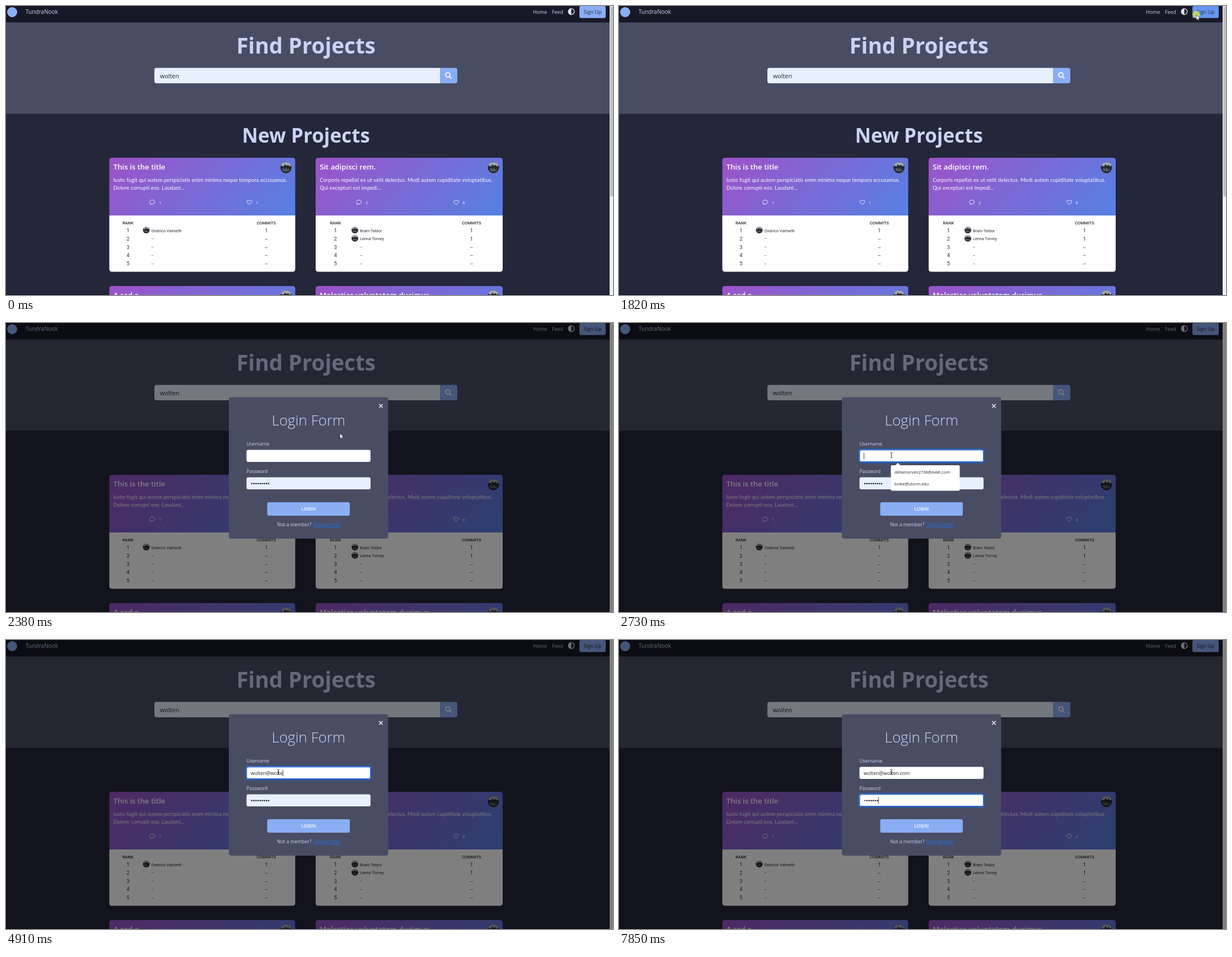
These frames come from a looping animation (1084 px wide and 516 px high, 8000 ms). An HTML page:

```html
<!DOCTYPE html>
<html lang="en">
<head>
<meta charset="utf-8">
<title>Find Projects</title>
<style>
  html, body { margin: 0; width: 100%; height: 100%; overflow: hidden; background: #24273a; }
  svg { display: block; width: 1084px; height: 516px; }
  text { font-family: "Open Sans", "Noto Sans", sans-serif; fill: #cad3f5; white-space: pre; }
  .mid { text-anchor: middle; }
  .w3 { font-weight: 300; }
  .w5 { font-weight: 500; }
  .w6 { font-weight: 600; }
  .w7 { font-weight: 700; }
  .white { fill: #fff; }
  .dark { fill: #24273a; }
  .ink { fill: #212529; }
  .link { fill: #1a73e8; text-decoration: underline; }
  .body { font-family: Lato, "Open Sans", sans-serif; letter-spacing: .12px; fill: #fff; }
  .cell { font-family: Roboto, sans-serif; fill: #2b2f33; }
</style>
</head>
<body>
<svg id="stage" viewBox="0 0 1084 516" xmlns="http://www.w3.org/2000/svg"></svg>
<script>
const LOOP = 8000;
const USER = 'wolten';
const EMAIL = USER + '@' + USER + '.com';
const FIELD_X = 437, DOT_STEP = 3.75;

const text = (x, y, size, cls, str, id = '') =>
  `<text x="${x}" y="${y}" font-size="${size}" class="${cls}"${id && ` id="${id}"`}>${str}</text>`;
const rect = (x, y, w, h, fill, r = 0, more = '') =>
  `<rect x="${x}" y="${y}" width="${w}" height="${h}" rx="${r}" fill="${fill}" ${more}/>`;
const circle = (x, y, r, fill, more = '') =>
  `<circle cx="${x}" cy="${y}" r="${r}" fill="${fill}" ${more}/>`;
const dots = (n, y, fill) => Array.from({ length: n }, (_, i) =>
  circle(439 + i * DOT_STEP, y, 1.3, fill)).join('');

const avatar = (x, y, r) => `<g transform="translate(${x} ${y}) scale(${r / 10})">
  ${circle(0, 0, 10, '#25272c')}
  <path d="M-9.3-3.5A10 10 0 0 1 9.3-3.5L6-2L4-5L1-3L-2-6L-4-2Z" fill="#a3a9af"/>
  <path d="M-7 3L-4 0L-2 3L1 0L3 4L6 1L5 6L0 7L-5 6Z" fill="#565b62"/></g>`;

const bubble = x => `<path transform="translate(${x} 79.5)" fill="none" stroke="#fff" stroke-width=".9"
  d="M-3.2 4L-3 1.9C-6-.5-3.8-4 0-4C6-4 6 3.2 0 3.2C-.9 3.2-1.4 3-1.8 2.9Z"/>`;
const heart = x => `<path transform="translate(${x} 79.5)" fill="none" stroke="#fff" stroke-width=".9"
  d="M0 4.1L-3.8.3C-6-2.2-2.5-5.4 0-2.4C2.5-5.4 6-2.2 3.8.3Z"/>`;

// Column positions are relative to the left edge of the card.
function card(c) {
  const w = c.w;
  let out = `<g transform="translate(${c.x} ${c.y})">` +
    `<path d="M0 103V5Q0 0 5 0H${w - 5}Q${w} 0 ${w} 5V103Z" fill="url(#shade)"/>` +
    `<path d="M0 103V198.5Q0 203.5 5 203.5H${w - 5}Q${w} 203.5 ${w} 198.5V103Z" fill="#fff"/>` +
    text(7.2, 21.3, 13.2, 'w6 white', c.title) + avatar(w - 16.5, 17.5, 10);
  if (c.lines) {
    out += c.lines.map((s, i) => text(7.2, 43 + i * 13.6, 9.35, 'body', s)).join('');
    out += bubble(c.talk) + text(c.talk + 12, 83, 7.3, 'white', c.counts[0]);
    out += heart(c.like) + text(c.like + 11.5, 83, 7.3, 'white', c.counts[1]);
    out += text(c.rank, 118.5, 7.5, 'cell w5 mid', 'RANK');
    out += text(c.commits, 118.5, 7.5, 'cell w5 mid', 'COMMITS');
    for (let i = 0; i < 5; i++) {
      const y = 132.9 + i * 14.8, name = c.names[i];
      out += text(c.rank, y, 9.4, 'cell mid', i + 1);
      out += text(c.name, y - .3, 7.3, 'cell', name || '--');
      out += text(c.commits, y, 9.4, 'cell mid', name ? 1 : '--');
      if (name) out += avatar(c.name - 9, y - 4, 6);
    }
  }
  return out + '</g>';
}

const left = { x: 184.5, w: 332 }, right = { x: 553, w: 334 };
const cards = [
  { ...left, y: 271, title: 'This is the title', talk: 76.5, like: 250, counts: [1, 1],
    rank: 33.3, name: 75, commits: 280.3, names: ['Ondrico Valmeth'],
    lines: ['Iusto fugit qui autem perspiciatis enim minima neque tempora accusamus.',
            'Dolore corrupti eos. Laudant...'] },
  { ...right, y: 271, title: 'Sit adipisci rem.', talk: 77, like: 251, counts: [2, 6],
    rank: 35.3, name: 79, commits: 278.3, names: ['Bram Teldor', 'Lenna Torvey'],
    lines: ['Corporis repellat ex ut velit delectus. Modi autem cupiditate voluptatibus.',
            'Qui excepturi est impedi...'] },
  { ...left, y: 500, title: 'A sed e' },
  { ...right, y: 500, title: 'Molestias voluptatem ducimus' }
];

const page = `
  ${rect(0, 0, 1084, 516, '#24273a')}
  ${rect(0, 0, 1078, 29.5, '#181926')}
  ${rect(0, 29.5, 1078, 163, '#494d64')}
  ${circle(11, 11, 9, '#8aadf4')}
  ${text(35, 13.5, 10, 'w5', 'TundraNook')}
  ${text(941.3, 14.3, 8.8, '', 'Home')}
  ${text(975, 14.3, 8.8, '', 'Feed')}
  ${circle(1009.5, 10, 5.3, 'none', 'stroke="#dde3fa" stroke-width="1.3"')}
  <path d="M1009.5 4.5a5.5 5.5 0 0 0 0 11Z" fill="#dde3fa"/>
  ${rect(1024, 0, 47, 21.5, '#8aadf4', 3, 'id="signup"')}
  ${text(1047.5, 14.3, 9, 'mid dark', 'Sign Up')}
  ${text(535.7, 85, 38.7, 'w7 mid', 'Find Projects')}
  ${text(535.7, 244, 35, 'w7 mid', 'New Projects')}
  <path d="M775 110.5H269Q265 110.5 265 114.5V134Q265 138 269 138H775Z" fill="#e8f0fe"/>
  <path d="M775 110.5H802Q806 110.5 806 114.5V134Q806 138 802 138H775Z" fill="#8aadf4"/>
  <g fill="none" stroke="#fff" stroke-width="1.8">
    <circle cx="789" cy="123" r="3.9"/><path d="M791.8 125.8L795.6 129.6"/></g>
  ${text(275, 128.6, 10.75, 'ink', USER)}
  ${rect(0, 514.5, 1078, 1.5, '#1a1b29')}
  ${cards.map(card).join('')}
  ${rect(1078, 0, 6, 516, '#f1f1f1')}
  ${rect(1079, 1.5, 5, 338.5, '#c1c1c1')}`;

const ring = (id, y) => `<g id="${id}" fill="none">
  ${rect(428.4, y - 1.1, 223.7, 23.7, 'none', 4, 'stroke="#0d6efd" stroke-opacity=".5" stroke-width="2.3"')}
  ${rect(430, y + .5, 220.5, 20.5, 'none', 3, 'stroke="#2f6fd6"')}</g>`;

const modal = `
  ${rect(0, 0, 1084, 516, '#000', 0, 'opacity=".5"')}
  ${rect(1078, 0, 6, 516, '#808080')}
  ${rect(398, 132.5, 284.5, 252.5, '#494d64', 4)}
  <path d="M666.3 144.8l6.4 6.4m0-6.4l-6.4 6.4" stroke="#e4e8fa" stroke-width="1.6"/>
  ${text(540.3, 183, 26, 'w3 mid', 'Login Form')}
  ${text(429.5, 218.6, 8.4, 'w5', 'Username')}
  ${text(429.5, 267.6, 8.4, 'w5', 'Password')}
  ${rect(429.5, 226.5, 221.5, 21.5, '#fff', 3)}
  ${rect(429.5, 275.5, 221.5, 21.5, '#e8f0fe', 3, 'id="passbox"')}
  ${ring('userRing', 226.5)}${ring('passRing', 275.5)}
  ${text(FIELD_X, 241, 8.63, 'ink', '', 'typed')}
  <g id="saved">${dots(9, 286.8, '#16181c')}</g>
  <g id="selected">${rect(437, 280.5, 34, 11.5, '#3390ff')}${dots(9, 286.8, '#fff')}</g>
  <g id="secret">${dots(7, 286.8, '#16181c')}</g>
  ${rect(0, 0, .8, 11.5, '#111', 0, 'id="caret"')}
  ${rect(466.5, 320, 147.5, 24, '#8aadf4', 3)}
  ${text(540.2, 335.3, 8.3, 'w6 mid white', 'LOGIN')}
  ${text(484, 363.2, 8.5, 'w5', 'Not a member?')}
  ${text(548.7, 363.2, 8.8, 'link', 'Signup now')}
  <g id="hints">
    ${rect(485.5, 254, 123, 45.5, '#fff', 2)}
    <path d="M493.5 254.2L498 249.8L502.5 254.2Z" fill="#fff"/>
    ${text(492, 269.4, 7.3, 'ink', 'dellamorven2738@ovlet.com')}
    ${text(492, 290, 7.3, 'ink', 'bolke@utorm.edu')}
  </g>`;

document.getElementById('stage').innerHTML = `
  <defs><linearGradient id="shade" gradientUnits="userSpaceOnUse" x1="57" y1="-57" x2="275" y2="160">
    <stop stop-color="#9d52c8"/><stop offset="1" stop-color="#5681e4"/></linearGradient></defs>
  ${page}
  <g id="modal">${modal}</g>
  <circle id="halo" fill="#cbdc55" opacity=".85"/>
  <path id="arrow" d="M0 0V9L2.1 7.2L3.5 10.2L4.9 9.6L3.6 6.7H6.4Z" fill="#fff" stroke="#111" stroke-width=".5"/>
  <path id="ibeam" d="M-1.8-4.5Q0-4.5 0-3.5Q0-4.5 1.8-4.5M0-3.5V3.5M-1.8 4.5Q0 4.5 0 3.5Q0 4.5 1.8 4.5"
    fill="none" stroke="#222" stroke-width=".9"/>`;

const el = Object.fromEntries([...document.querySelectorAll('[id]')].map(n => [n.id, n]));
const show = (node, on) => node.setAttribute('visibility', on ? 'inherit' : 'hidden');
const ramp = (t, a, b) => Math.min(1, Math.max(0, (t - a) / (b - a)));
const passed = (times, t) => times.filter(k => t >= k).length;

const keys = [3540, 3600, 3710, 3880, 3980, 4080, 4380, 4610, 4690, 4770, 4840, 4910,
  5110, 5280, 5540, 5740, 5800];
const passKeys = [6180, 6410, 6700, 6960, 7230, 7520, 7850];
const OPEN = 1860, FOCUS = 2570, TAB = 5950;

// time, x, y of the pointer
const path = [[20, 1031, 483], [200, 1020, 366], [520, 1020, 366], [820, 1023, 240],
  [1100, 1003, 75], [1320, 985, 18], [1350, 985, 18], [1610, 1031, 16], [1820, 1031, 16],
  [1860, 1024, 18], [2200, 730, 150], [2540, 486.5, 236]];

function pointer(t) {
  const i = path.findIndex(p => p[0] > t);
  if (i < 0) return path[path.length - 1].slice(1);
  if (i === 0) return path[0].slice(1);
  const [a, b] = [path[i - 1], path[i]];
  const u = ramp(t, a[0], b[0]), e = u * u * (3 - 2 * u);
  return [a[1] + (b[1] - a[1]) * e, a[2] + (b[2] - a[2]) * e];
}

function draw(t) {
  const [x, y] = pointer(t);
  const inField = t >= 2500;
  show(el.arrow, t >= 20 && !inField);
  show(el.ibeam, inField);
  (inField ? el.ibeam : el.arrow).setAttribute('transform', `translate(${x} ${y})`);

  const click = [1750, FOCUS].find(c => t >= c && t < c + 110);
  show(el.halo, click);
  if (click) {
    el.halo.setAttribute('cx', x);
    el.halo.setAttribute('cy', y - 1);
    el.halo.setAttribute('r', 4 + 2.5 * ramp(t, click, click + 70));
  }
  el.signup.setAttribute('fill', t >= 1500 && t < OPEN + 60 ? '#6796f1' : '#8aadf4');

  show(el.modal, t >= OPEN);
  if (t < OPEN) {
    for (const id of ['userRing', 'passRing', 'saved', 'selected', 'secret', 'caret', 'hints'])
      show(el[id], false);
    return;
  }
  const count = passed(keys, t), secret = passed(passKeys, t);
  el.typed.textContent = EMAIL.slice(0, count);
  show(el.userRing, t >= FOCUS && t < TAB);
  el.userRing.setAttribute('opacity', ramp(t, FOCUS, 2720));
  show(el.passRing, t >= TAB);
  el.passbox.setAttribute('fill', secret ? '#fff' : '#e8f0fe');
  show(el.saved, t < TAB);
  show(el.selected, t >= TAB && !secret);
  show(el.secret, secret);
  [...el.secret.children].forEach((dot, i) => show(dot, i < secret));
  el.secret.firstElementChild.setAttribute('r', 1);

  show(el.hints, t >= FOCUS && t < 3700);
  el.hints.setAttribute('opacity', ramp(t, FOCUS, 2720) * (1 - ramp(t, 3540, 3700)));

  const blinkOff = t >= 3140 && t < 3540;
  show(el.caret, t >= FOCUS && !blinkOff && (t < TAB || secret));
  const width = secret ? secret * DOT_STEP : count && el.typed.getComputedTextLength();
  el.caret.setAttribute('x', FIELD_X + width);
  el.caret.setAttribute('y', secret ? 280.5 : 231.8);
}

const start = performance.now();
function tick() {
  draw((performance.now() - start) % LOOP);
  requestAnimationFrame(tick);
}
tick();
</script>
</body>
</html>
```
